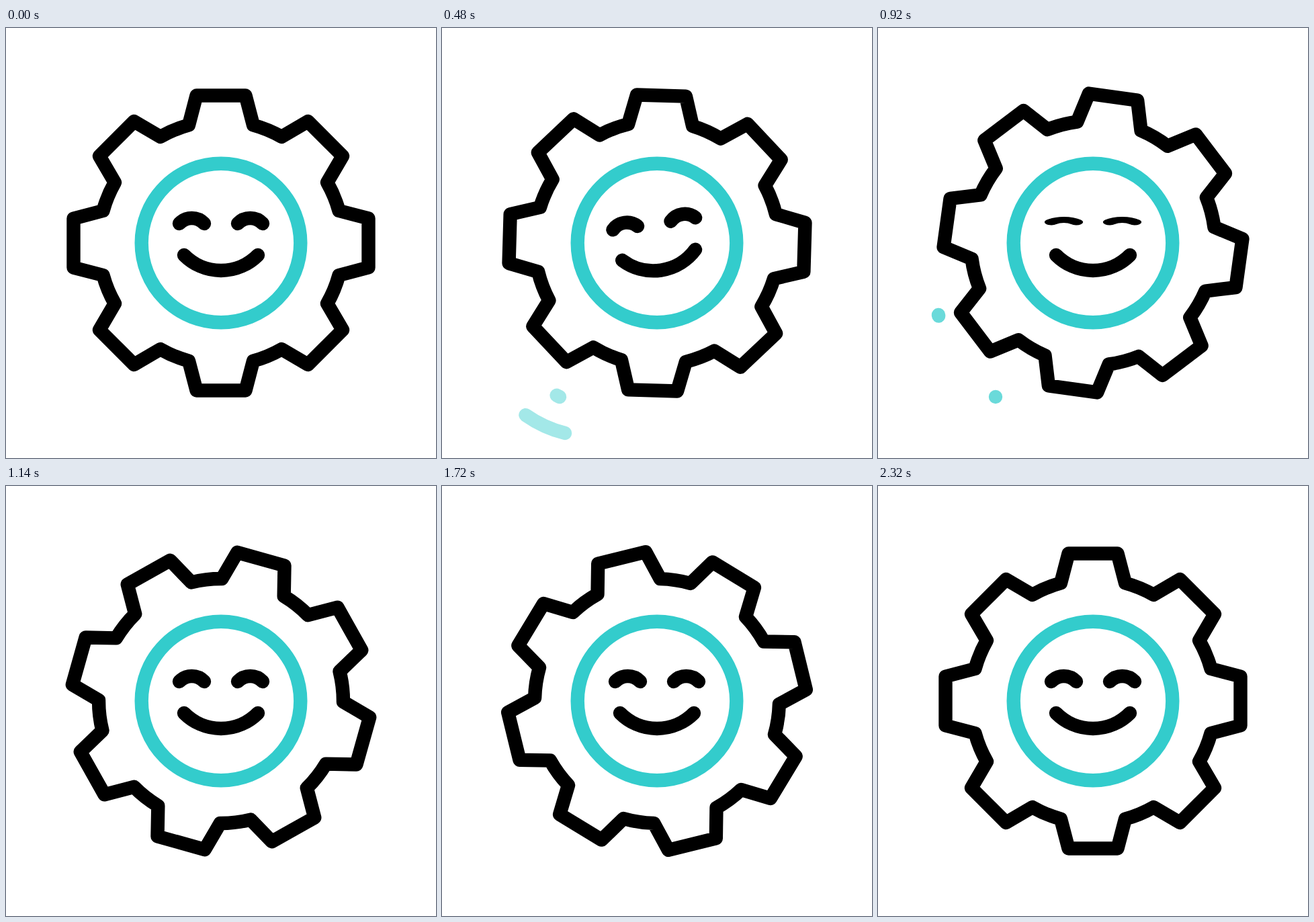
An HTML page for the animation above (2.42 s loop, 640 px wide and 640 px high).

```html
<!DOCTYPE html>
<html lang="en">
<head>
<meta charset="utf-8">
<title>Happy gear</title>
<style>
  html, body { margin: 0; width: 100%; height: 100%; overflow: hidden; background: #fff; }
  svg { display: block; width: 100vw; height: 100vh; }
  path, circle { fill: none; stroke: #000; stroke-width: 20.4; stroke-linecap: round; stroke-linejoin: round; }
  .teal { stroke: #3cc; }
</style>
</head>
<body>
<svg viewBox="0 0 640 640">
  <g id="lines">
    <path id="inner" class="teal" pathLength="1" d="M175 549A152 152 0 0 1 90 427"/>
    <path id="outer" class="teal" pathLength="1" d="M183 603A178 178 0 0 1 59 490"/>
  </g>
  <path id="gear"/>
  <circle class="teal" cx="320" cy="320" r="118.3"/>
  <g id="face">
    <g id="eyes"><path d="M258 291A25.4 25.4 0 0 1 295 291M345 291A25.4 25.4 0 0 1 382 291"/></g>
    <path d="M265 338A77.3 77.3 0 0 0 375 338"/>
  </g>
</svg>
<script>
const LOOP = 2420, END = 2320;
const $ = id => document.getElementById(id);
const [lines, inner, outer, gear, face, eyes] =
  ['lines', 'inner', 'outer', 'gear', 'face', 'eyes'].map($);

// One tooth, repeated eight times and joined by arcs of the rim.
const tooth = [[-48, -175.5], [-36.5, -219.5], [36.5, -219.5], [48, -175.5]];
let d = '';
for (let i = 0; i < 8; i++) {
  const c = Math.cos(i * Math.PI / 4), s = Math.sin(i * Math.PI / 4);
  tooth.forEach(([x, y], k) => {
    d += (k ? 'L' : i ? 'A182 182 0 0 1 ' : 'M') +
      (x * c - y * s).toFixed(2) + ' ' + (x * s + y * c).toFixed(2);
  });
}
gear.setAttribute('d', d + 'A182 182 0 0 1 -48 -175.5Z');

const progress = (t, from, to) => Math.min(1, Math.max(0, (t - from) / (to - from)));
const smooth = p => p * p * (3 - 2 * p);
const ease = (t, from, to) => smooth(progress(t, from, to));

// Quick start and a very long slow-down: cubic-bezier(.325, 0, .02, 1).
function launch(p) {
  let lo = 0, hi = 1;
  for (let i = 0; i < 30; i++) {
    const s = (lo + hi) / 2, w = 1 - s;
    if (3 * w * w * s * .325 + 3 * w * s * s * .02 + s * s * s < p) lo = s; else hi = s;
  }
  return smooth((lo + hi) / 2);
}

function trim(path, start, end) {
  path.style.display = end > 0 && start < 1 ? '' : 'none';
  path.setAttribute('stroke-dasharray', `0 ${start} ${Math.max(.001, end - start)} 3`);
}

function draw(t) {
  const spin = -30 * ease(t, 0, 223) + 390 * launch(progress(t, 223, END));
  gear.setAttribute('transform', `translate(320 320) rotate(${spin})`);

  const tilt = -10 * ease(t, 0, 433) + 15 * ease(t, 433, 667) - 5 * ease(t, 667, 867);
  face.setAttribute('transform', `rotate(${tilt} 320 320)`);

  const open = 1 - ease(t, 867, 967) + ease(t, 967, 1067);
  eyes.setAttribute('transform', `translate(0 287.3) scale(1 ${open}) translate(0 -287.3)`);

  lines.setAttribute('opacity', ease(t, 360, 620) - ease(t, 880, 1000));
  trim(inner, .99 * ease(t, 640, 920), ease(t, 453, 714));
  trim(outer, ease(t, 477, 827), ease(t, 336, 687));
}

function tick() {
  draw(performance.now() % LOOP);
  requestAnimationFrame(tick);
}
tick();
</script>
</body>
</html>
```
